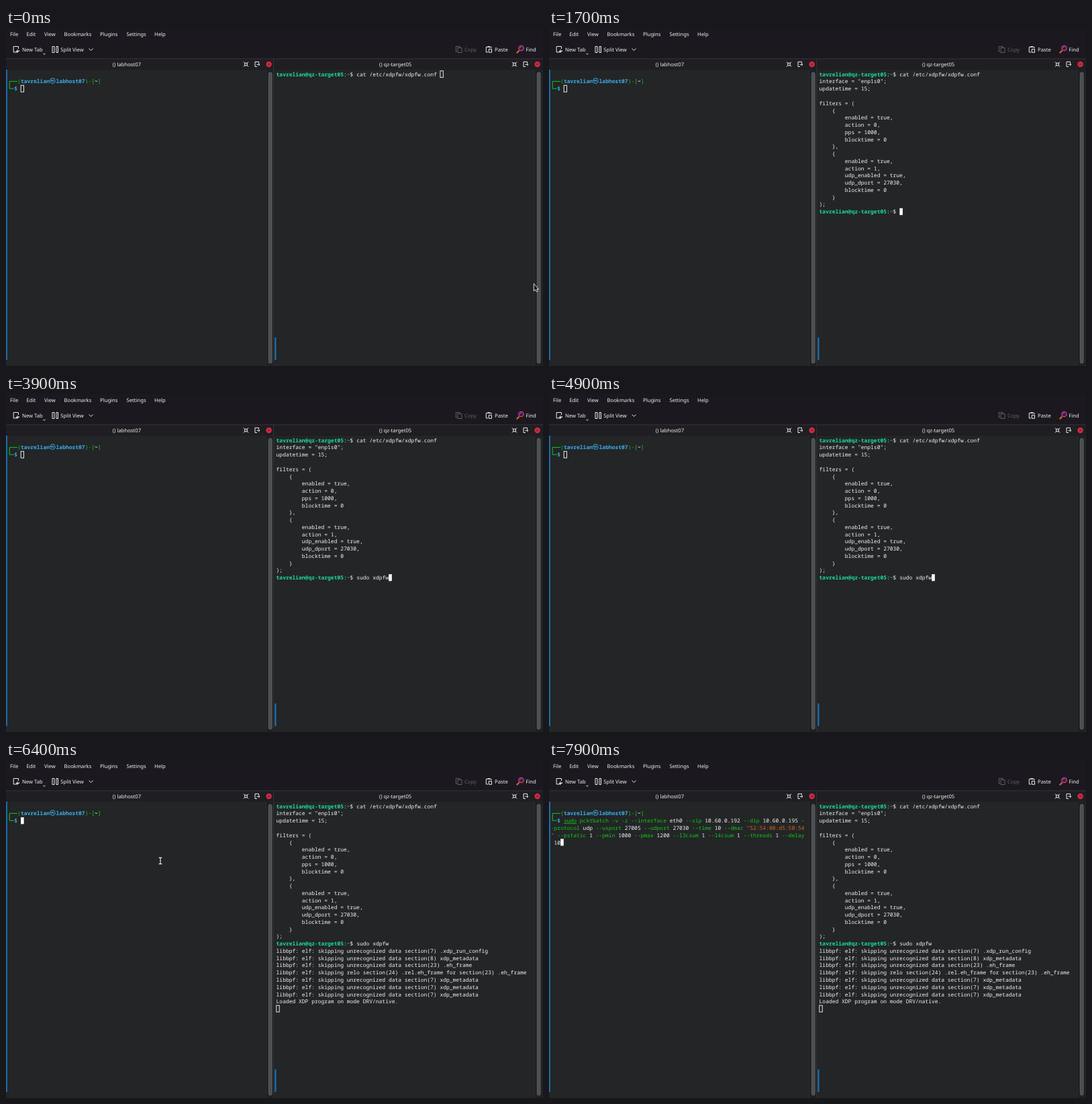
Write an HTML page that moves like this. It is 800 by 503 pixels and loops after 8000 ms.

```html
<!DOCTYPE html>
<html lang="en">
<head>
<meta charset="utf-8">
<title>Split terminal</title>
<style>
html, body { margin: 0; width: 100%; height: 100%; overflow: hidden; background: #232527; }
svg { display: block; width: 100vw; height: 100vh; }
text { white-space: pre; text-rendering: geometricPrecision; }
.ui { font: 7.7px "Noto Sans", sans-serif; fill: #f0f0f1; }
.term { font: 7.978px "Noto Sans Mono", monospace; fill: #f2f2f2; }
.icon { fill: none; stroke: #eeeeef; stroke-width: 1; }
.dim { opacity: .32; }
.host { fill: #1cdc9a; font-weight: 700; }
.user { fill: #3daee9; font-weight: 700; }
.bold { font-weight: 700; }
.opt { fill: #11c816; }
.pre { fill: #11c816; text-decoration: underline; }
.str { fill: #d8661a; }
</style>
</head>
<body>
<svg id="stage" viewBox="0 0 800 503" preserveAspectRatio="none" xmlns="http://www.w3.org/2000/svg"></svg>
<script>
const NS = "http://www.w3.org/2000/svg";
const LOOP = 8000;
const CHAR = 4.787, LINE = 10.763, TOP = 63.3;
const LEFT = 2.8, RIGHT = 402.6;
const USER = "tavrelian", LEFT_HOST = "labhost07", RIGHT_HOST = "qz-target05";
const stage = document.getElementById("stage");

function add(parent, tag, attrs = {}, content) {
  const el = document.createElementNS(NS, tag);
  for (const key in attrs) el.setAttribute(key, attrs[key]);
  if (content !== undefined) el.textContent = content;
  parent.appendChild(el);
  return el;
}
const group = (parent = stage, attrs) => add(parent, "g", attrs);
const rect = (parent, x, y, width, height, fill, more) =>
  add(parent, "rect", { x, y, width, height, fill, ...more });
const label = (x, y, text, cls = "ui") => add(stage, "text", { x, y, class: cls }, text);
const icon = (d, more) => add(stage, "path", { d, class: "icon", ...more });
const show = (el, on) => el.setAttribute("visibility", on ? "visible" : "hidden");

// A terminal line made of [class, text] runs
function line(parent, x, row, col, ...runs) {
  const el = add(parent, "text", {
    x: x + col * CHAR, y: TOP + row * LINE + 8.4, class: "term"
  });
  for (const [cls, text] of runs) add(el, "tspan", { class: cls }, text);
}
function block(parent, x, row, text) {
  text.split("\n").forEach((s, i) => line(parent, x, row + i, 0, ["", s]));
}

// Window chrome
function drawWindow() {
  rect(stage, 0, 0, 800, 503, "#232527");
  rect(stage, 0, 0, 800, 46, "#1b191f");
  rect(stage, 0, 46, 800, 16, "#1f1e22");
  rect(stage, 0, 45.4, 800, 0.8, "#3a393e");
  const menu = { File: 6, Edit: 30.5, View: 57, Bookmarks: 86.5, Plugins: 140, Settings: 179.5, Help: 221 };
  for (const name in menu) label(menu[name], 12, name);

  label(24, 34.7, "New Tab");
  label(81.3, 34.7, "Split View");
  label(683, 34.7, "Copy", "ui dim");
  label(728, 34.7, "Paste");
  label(774.3, 34.7, "Find");

  icon("M16 36H11.2V27.5H18.5V31M16 36L20 33.5M17 32V37M14.8 34.5H20");
  icon("M55.5 38L57 39.3L58.5 38", { "stroke-width": .8 });
  icon("M69 27.5H72V36.5H69ZM75 27.5H77.5V36.5H75Z", { "stroke-width": 1.4 });
  icon("M123.6 30.5L126.6 33.5L129.6 30.5");
  icon("M672 35H670.3V27.5H676V29M673 29.5H679V36.5H673Z", { class: "icon dim" });
  icon("M718 36H715.3V28.3H723V30M717.5 27.6H721M719.3 31.4H723.5V36.3H719.3Z", { "stroke-width": 1.1 });
  icon("M764.5 33.5L760.8 37.3", { style: "stroke:#e5652f;stroke-width:2" });
  add(stage, "circle", { cx: 767.5, cy: 30, r: 3.7, fill: "#3a1a48", stroke: "#d3407c", "stroke-width": 1.3 });
  icon("M765.7 29.7Q766 28 768 28", { style: "stroke:#6c8ae8;stroke-width:.9" });
}

function drawPane(x, title, titleX) {
  label(titleX, 56.9, "() " + title);
  icon(`M${x + 354} 50.5L${x + 356} 52.5M${x + 361} 50.5L${x + 359} 52.5M${x + 354} 57.5L${x + 356} 55.5M${x + 361} 57.5L${x + 359} 55.5M${x + 355.7} 52.2H${x + 359.3}V55.8H${x + 355.7}Z`);
  icon(`M${x + 374} 57.5H${x + 371}V50.3H${x + 376.5}V52.5M${x + 373.5} 54.3H${x + 378}M${x + 376.2} 52.5L${x + 378} 54.3L${x + 376.2} 56.1`);
  add(stage, "circle", { cx: x + 391.6, cy: 54, r: 4.2, fill: "#da2945" });
  icon(`M${x + 390} 52.4L${x + 393.2} 55.6M${x + 393.2} 52.4L${x + 390} 55.6`, { style: "stroke:#551622;stroke-width:.9" });
  rect(stage, x + 387.5, 62, 11, 441, "#1f2023");
  rect(stage, x + 387.2, 62, .6, 441, "#303235");
  rect(stage, x + 391.3, 66, 4.8, 433, "#4c4e51", { rx: 2.4, stroke: "#77797b", "stroke-width": .6 });
}

drawWindow();
drawPane(0, LEFT_HOST, 158.8);
drawPane(400, RIGHT_HOST, 556);
rect(stage, 398.2, 46, .8, 457, "#343639");
rect(stage, 0, 62, 2, 432, "#1d6ba5");
rect(stage, 400.2, 460.5, 2.4, 33.5, "#1d6ba5");

// Left terminal
const left = group();
add(left, "path", { d: "M17 79.4H5.2V90.2H12", fill: "none", stroke: "#11c816", "stroke-width": 1 });
line(left, LEFT, 1, 3, ["opt", "("], ["user", USER]);
add(left, "text", {
  x: LEFT + 13 * CHAR, y: TOP + LINE + 8.4, fill: "#3daee9",
  style: 'font:700 9px "Noto Sans CJK KR","Noto Sans CJK JP","Noto Sans CJK",sans-serif'
}, "㉿");
line(left, LEFT, 1, 15, ["user", LEFT_HOST], ["opt", ")-["], ["bold", "~"], ["opt", "]"]);
line(left, LEFT, 2, 2, ["user", "$"]);

const attack = group();
function commandLine(row, col, text) {
  const runs = text.match(/"[\d:a-f]+|"|\S+|\s+/g).map(s => {
    if (s === "sudo") return ["pre", s];
    if (s[0] === '"') return ["str", s];
    return [s[0] === "-" || s === "pcktbatch" ? "opt" : "", s];
  });
  line(attack, LEFT, row, col, ...runs);
}
commandLine(2, 4, "sudo pcktbatch -v -z --interface eth0 --sip 10.60.0.192 --dip 10.60.0.195 -");
commandLine(3, 0, '-protocol udp --usport 27005 --udport 27030 --time 10 --dmac "52:54:00:d5:50:54');
commandLine(4, 0, '" --pstatic 1 --pmin 1000 --pmax 1200 --l3csum 1 --l4csum 1 --threads 1 --delay');
commandLine(5, 0, " 10");

// Right terminal
const CAT = "cat /etc/xdpfw/xdpfw.conf ", RUN = "sudo xdpfw";
function prompt(parent, row) {
  line(parent, RIGHT, row, 0, ["host", USER + "@" + RIGHT_HOST], ["", ":"], ["user", "~"], ["", "$"]);
}
prompt(stage, 0);
line(stage, RIGHT, 0, 25, ["", CAT]);

const config = group();
block(config, RIGHT, 1, `interface = "enp1s0";
updatetime = 15;

filters = (
    {
        enabled = true,
        action = 0,
        pps = 1000,
        blocktime = 0
    },
    {
        enabled = true,
        action = 1,
        udp_enabled = true,
        udp_dport = 27030,
        blocktime = 0
    }
);`);
prompt(config, 19);
const recalled = group();
line(recalled, RIGHT, 19, 25, ["", CAT]);
const started = group();
line(started, RIGHT, 19, 25, ["", RUN]);

const log = group();
const skip = "libbpf: elf: skipping ", data = skip + "unrecognized data section";
block(log, RIGHT, 20, [
  data + "(7) .xdp_run_config",
  data + "(8) xdp_metadata",
  data + "(23) .eh_frame",
  skip + "relo section(24) .rel.eh_frame for section(23) .eh_frame",
  ...Array(3).fill(data + "(7) xdp_metadata")
].join("\n"));
const loaded = group();
block(loaded, RIGHT, 27, "Loaded XDP program on mode DRV/native.");

// Block cursors and the pointer
const leftCaret = rect(stage, 0, 0, 4.4, 9.8);
const rightCaret = rect(stage, 0, 0, 4.4, 9.8);
function placeCaret(el, x, row, col, solid) {
  el.setAttribute("x", x + col * CHAR + .2);
  el.setAttribute("y", TOP + row * LINE + .5);
  el.setAttribute("fill", solid ? "#fcfcfc" : "none");
  el.setAttribute("stroke", "#fcfcfc");
  el.setAttribute("stroke-width", solid ? .3 : .9);
}
const arrow = add(stage, "path", {
  d: "M0 0V11.2L2.6 9L4.2 12.3L6 11.4L4.6 8.2H7Z",
  fill: "#151618", stroke: "#f4f4f4", "stroke-width": .9, "stroke-linejoin": "round"
});
const beam = group();
for (const [stroke, width] of [["#151618", 2.4], ["#f6f6f6", 1.2]])
  add(beam, "path", { d: "M-2.4 -4.7H2.4M0 -4.7V4.7M-2.4 4.7H2.4", fill: "none", stroke, "stroke-width": width });

// Pointer path: [time, x, y]
const path = [[50, 786.3, 380.3], [600, 491, 214], [1150, 491, 214], [1350, 504, 210], [5850, 504, 210], [6200, 230, 150]];
function pointerAt(t) {
  if (t <= path[0][0]) return path[0].slice(1);
  for (let i = 1; i < path.length; i++) {
    const [t0, x0, y0] = path[i - 1], [t1, x1, y1] = path[i];
    if (t > t1) continue;
    const p = (t - t0) / (t1 - t0), k = p * p * (3 - 2 * p);
    return [x0 + (x1 - x0) * k, y0 + (y1 - y0) * k];
  }
  return path[path.length - 1].slice(1);
}

const T = { focusRight: 850, cat: 1400, recall: 2200, next: 2900, run: 5300, wake: 5500, loaded: 6050, focusLeft: 6250, attack: 6500 };

function render(t) {
  show(config, t >= T.cat);
  show(recalled, t >= T.recall && t < T.next);
  show(started, t >= T.next);
  show(log, t >= T.run);
  show(loaded, t >= T.loaded);
  show(attack, t >= T.attack);

  let row = 0, col = 25 + CAT.length;
  if (t >= T.loaded) [row, col] = [28, 0];
  else if (t >= T.run) [row, col] = [27, 0];
  else if (t >= T.next) [row, col] = [19, 25 + RUN.length];
  else if (t >= T.recall) row = 19;
  else if (t >= T.cat) [row, col] = [19, 25];
  placeCaret(rightCaret, RIGHT, row, col, t >= T.focusRight && t < T.focusLeft);
  const typed = t >= T.attack;
  placeCaret(leftCaret, LEFT, typed ? 5 : 2, typed ? 3 : 4, t >= T.focusLeft);

  // The pointer hides while keys are pressed
  const [x, y] = pointerAt(t);
  const visible = t < T.cat || (t >= T.wake && t < T.attack);
  const overBar = x > 787 || (x > 780 && t < 200);
  show(arrow, visible && overBar);
  show(beam, visible && !overBar);
  arrow.setAttribute("transform", `translate(${x} ${y})`);
  beam.setAttribute("transform", `translate(${x} ${y})`);
}

const start = performance.now();
function tick() {
  render((performance.now() - start) % LOOP);
  requestAnimationFrame(tick);
}
render(0);
requestAnimationFrame(tick);
</script>
</body>
</html>
```
